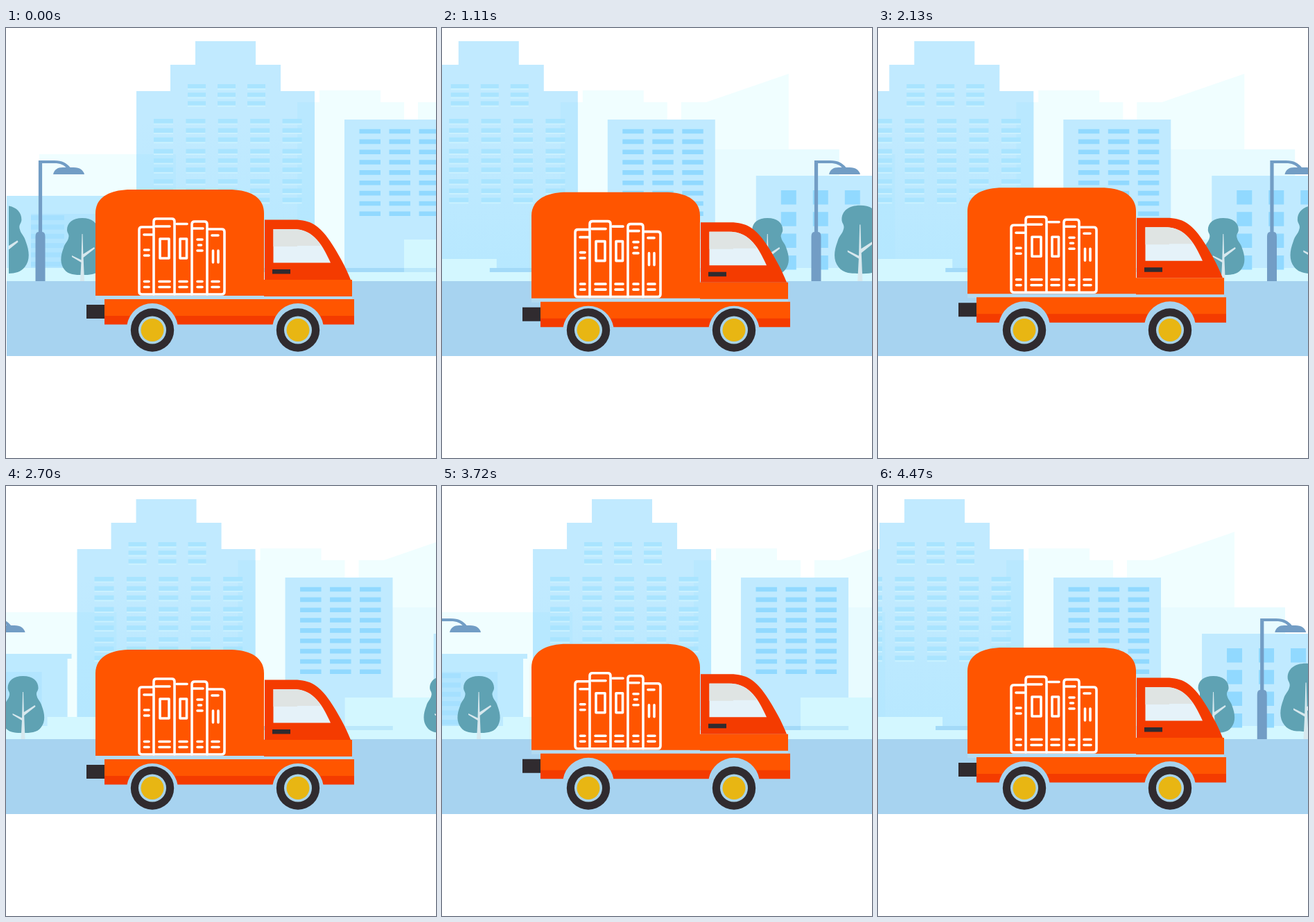
Recreate the animation shown at these times as an HTML page. Size 620 px wide and 620 px high, loop 4500 ms.

```html
<!DOCTYPE html>
<html lang="en">
<head>
<meta charset="utf-8">
<title>Book delivery van</title>
<style>
html, body { margin: 0; width: 100%; height: 100%; overflow: hidden; background: #fff; }
svg { display: block; width: 100%; height: 100%; }
</style>
</head>
<body>
<svg viewBox="0 0 620 620">
  <defs>
    <linearGradient id="tower" gradientUnits="userSpaceOnUse" x1="0" y1="20" x2="0" y2="350">
      <stop offset=".35" stop-color="#c1eaff"/><stop offset="1" stop-color="#b7e8ff"/>
    </linearGradient>
    <!-- origin at the foot of the trunk -->
    <g id="tree">
      <path fill="#5fa2b3" d="M0-91C14-91 22-84 22-74C22-69 18-68 20-62C21-57 25-55 27-48C32-35 32-25 26-17C20-9 10-9 0-9S-20-9-26-17C-32-25-32-35-27-48C-25-55-21-57-20-62C-18-68-22-69-22-74C-22-84-14-91 0-91Z"/>
      <path fill="#d7e8ee" d="M-3 0L-1.6-27L-15-35V-37L-1.5-30.5L-.5-68H.5L1.3-39L17-49L18-47L1.6-34L3 0Z"/>
    </g>
    <!-- origin at the foot of the post -->
    <g id="lamp" fill="#729dc5">
      <path d="M-7 0V-64Q-7-71-2.6-71V-174H20C32-174 38-170 43-164L40-161C34-168 29-170 20-170H2.6V-71Q7-71 7-64V0Z"/>
      <path d="M18.500-154C20-161 25-164 32-164H48C57-164 62-160 63.500-154Z"/>
    </g>
  </defs>

  <g id="city">
    <g fill="#f0feff">
      <path d="M48 182H245V350H48ZM420 350V107H452V90H540V107H574V350ZM594 350V107H630L749 66V350Z"/>
      <path fill="#e8fbff" d="M633 175H822V350H633Z"/>
    </g>
    <path fill="url(#tower)" d="M188 350V91H237V53H273V19H360V53H396V91H445V350Z"/>
    <path fill="#b3e8ff" opacity=".55" d="M188 182H245V350H188ZM420 107H445V350H420Z"/>
    <path fill="#bdeaff" d="M1 242H180V249H174V350H1Z"/>
    <path fill="#b2e5ff" d="M36 268H137V350H36Z"/>
    <path fill="#c0eaff" d="M488 132H643V350H488ZM702 213H900V350H702Z"/>
    <path fill="#d3f7ff" d="M145 333H328V346H145ZM574 305H701V346H574ZM1 346H900V366H1Z"/>
    <path fill="#a3daf8" d="M318 346H643V352H318Z"/>
    <path fill="#d3f7ff" opacity=".5" d="M574 346H643V352H574Z"/>
    <g id="windows"></g>
    <path fill="#a7d3f0" d="M1 365H900V473H1Z"/>
    <svg x="4" y="240" width="60" height="130"><use href="#tree" transform="translate(-8 125) scale(1.2)"/></svg>
    <use href="#lamp" x="49.500" y="365"/>
    <use href="#tree" x="110" y="365"/>
    <use href="#tree" x="718.500" y="365"/>
    <use href="#lamp" x="788.700" y="365"/>
    <use href="#tree" transform="translate(852 365) scale(1.2)"/>
  </g>

  <g id="van">
    <path fill="#b3dbf2" d="M129 385H499V392H129Z"/>
    <path fill="#ff5500" d="M129 386V267C129 246 147 233 180 233H321C355 233 372 246 372 267V363H499V387H372V386ZM142 391H502V416H142Z"/>
    <path fill="#f43b00" d="M373 276.500H416C439 276.500 452 285 467 307C479 325 490 345 497 363H373ZM142 415H502V427.500H142Z"/>
    <path fill="#e5f2f9" d="M385.500 290H414C445 290 457 315 468 338.500H385.500Z"/>
    <path fill="#dfe4e3" d="M385.500 290H414C434 290 446 300 454 314H420V315H385.500Z"/>
    <path fill="#302b2f" d="M384 348H410V354.500H384ZM116 399H142V419H116Z"/>
    <path fill="#a7d3ee" d="M174.500 428a37 37 0 0 1 73 0zM384.500 428a37 37 0 0 1 73 0z"/>
    <g fill="none" stroke="#fff" stroke-width="3.600" stroke-linecap="round" stroke-linejoin="round">
      <path d="M212 287H196Q192 287 192 291V380Q192 384 196 384H311Q315 384 315 380V294Q315 290 311 290H292"/>
      <path d="M213 384V279Q213 275 217 275H239Q243 275 243 279V384M268 384V283Q268 279 272 279H286Q290 279 290 283V384"/>
      <path d="M199 298H211M216 286H236M246 282.500H261M269 289H284M297 299H306M222 304H235V332H222ZM251 304H260.500V332H251ZM298.500 321V338M306 321V338"/>
      <path d="M199.500 320H206M199.500 328H206M276 305H283M277.500 313H281.500M276 321H283"/>
      <path id="bands"/>
    </g>
  </g>

  <g id="wheels"></g>
</svg>
<script>
const $ = id => document.getElementById(id);

const grid = (xs, ys, w, h, color) =>
  `<path fill="${color}" d="${xs.flatMap(x => ys.map(y => `M${x} ${y}h${w}v${h}h${-w}z`)).join('')}"/>`;
const rows = (start, step, count) => Array.from({ length: count }, (_, i) => start + i * step);

const topXs = [262, 305, 348], topYs = rows(81, 12.2, 3);
const midXs = rows(213, 46.4, 5);
const midYs = [131, 174.5, 218].flatMap(y => rows(y, 13.4, 3));

$('windows').innerHTML =
  grid(topXs, topYs.map(y => y + 6), 26, 2.5, '#caf1ff') +
  grid(topXs, topYs, 26, 6, '#a9e4ff') +
  grid(midXs, midYs.map(y => y + 6), 28, 2.5, '#caf1ff') +
  grid(midXs, midYs, 28, 6.5, '#a9e4ff') +
  grid([509.5, 552.5, 595.5], rows(145.7, 14.85, 9), 30.5, 6.6, '#91d9ff') +
  grid(rows(738, 46, 3), rows(234, 31.3, 4), 22, 20.5, '#91d9ff') +
  grid([36], rows(270, 13.4, 6), 48, 7, '#a5e0ff');

$('bands').setAttribute('d',
  [[199.5, 206], [221, 236], [250, 261], [276, 283], [297, 307]]
    .map(([a, b]) => `M${a} 365.500H${b}M${a} 373.500H${b}`).join(''));

$('wheels').innerHTML = [211, 421].map(x =>
  [[31.2, '#302b2f'], [20, '#a9d3e8'], [16.5, '#e8b613']]
    .map(([r, c]) => `<circle cx="${x}" cy="435.500" r="${r}" fill="${c}"/>`).join('')).join('');

const LOOP = 4500, PASS = 1140, STEP = 30, SPEED = 7.12, BOUNCE = 11;
const bumps = [[0, 0], [1, 3], [2.5, 4], [7.3, -5.5], [8, -5.2], [9, -2.8], [11, 0]];

function bounce(step) {
  const p = step % BOUNCE;
  const i = bumps.findIndex(b => b[0] > p);
  const [x0, y0] = bumps[i - 1], [x1, y1] = bumps[i];
  return y0 + (y1 - y0) * (p - x0) / (x1 - x0);
}

function draw(now) {
  // Each pass rests for three ticks, scrolls on, then jumps back.
  const tick = Math.floor(now % LOOP % PASS / STEP);
  const step = Math.max(0, tick - 2);
  $('city').setAttribute('transform', `translate(${-step * SPEED} 0)`);
  $('van').setAttribute('transform', `translate(0 ${bounce(step)})`);
}

const start = performance.now();
function loop() {
  draw(performance.now() - start);
  requestAnimationFrame(loop);
}
loop();
</script>
</body>
</html>
```
